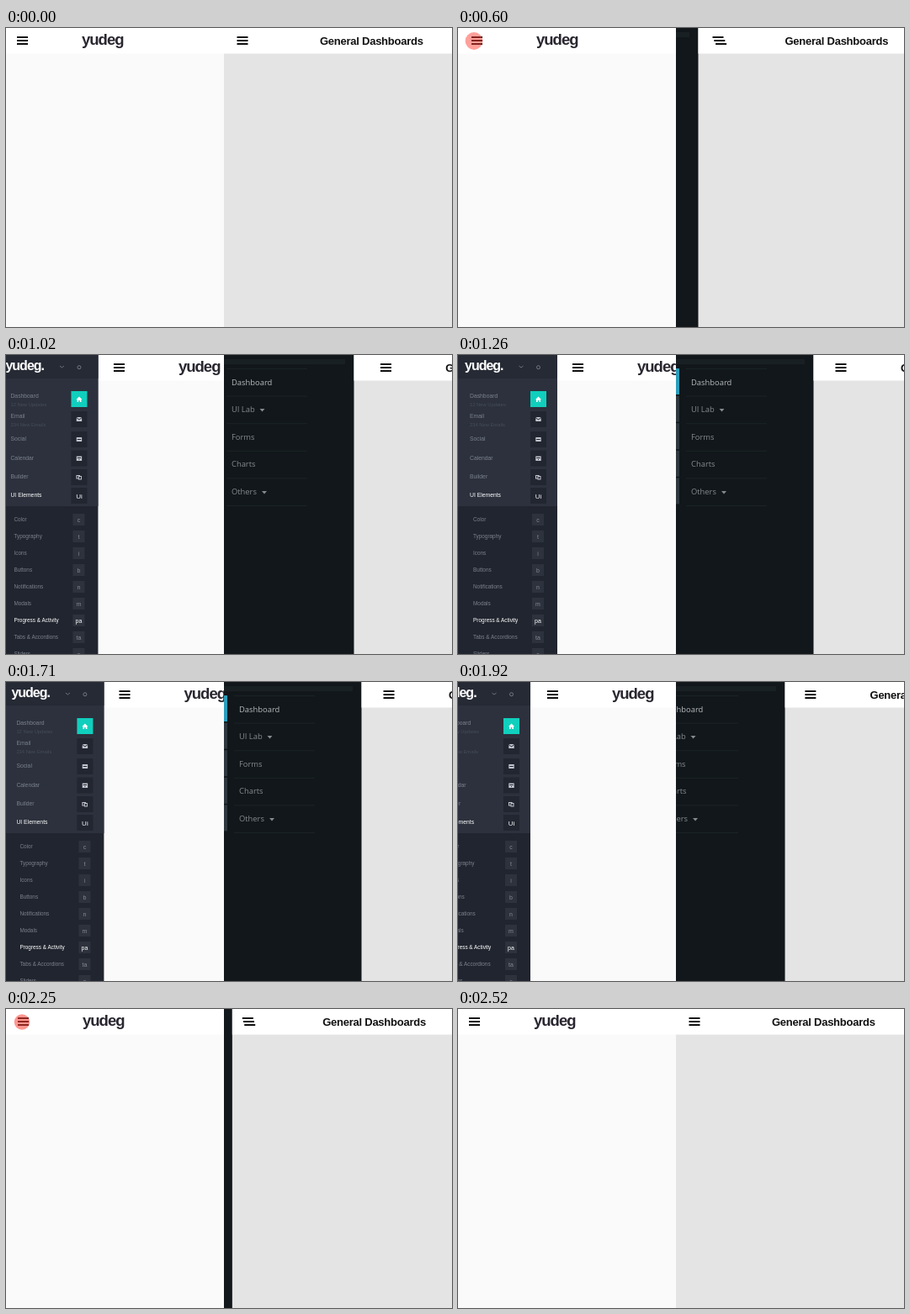
An HTML page for the animation above (2.82 s loop, 530 by 356 pixels).

```html
<!DOCTYPE html>
<html lang="en">
<head>
<meta charset="utf-8">
<title>Sliding menus</title>
<style>
  html, body { margin: 0; width: 100%; height: 100%; overflow: hidden; background: #fafafa; }
  svg { display: block; }
  text { font-family: "Liberation Sans", Arial, sans-serif; white-space: pre; }
  .brand { font-weight: bold; letter-spacing: -1px; }
  .title { font-weight: bold; font-size: 13px; letter-spacing: -.25px; fill: #111; }
  .nav { font: 9.4px "Open Sans", "Noto Sans", sans-serif; fill: #858b8f; }
  .main { font-size: 6.8px; fill: #7b818d; }
  .note { font-size: 5.8px; fill: #474d5a; }
  .sub { font-size: 6.4px; fill: #7b808b; }
  .key { font-size: 7px; fill: #858a95; text-anchor: middle; }
  .main.on, .sub.on, .key.on { fill: #fff; }
  .icon { fill: #c3c6cd; }
</style>
</head>
<body>
<svg width="530" height="356" viewBox="0 0 530 356">
  <clipPath id="leftHalf"><rect width="259" height="356"/></clipPath>
  <clipPath id="rightHalf"><rect x="259" width="271" height="356"/></clipPath>

  <g clip-path="url(#leftHalf)">
    <rect width="259" height="356" fill="#fafafa"/>
    <rect width="259" height="30.5" fill="#fff"/>
    <g id="page">
      <path d="M13 11h13M13 15h13M13 19h13" stroke="#111" stroke-width="2"/>
      <text class="brand" x="90" y="19.5" font-size="18.5" fill="#2a2730">yudeg</text>
    </g>
    <g id="sidebar">
      <rect x="-20" width="138" height="356" fill="#21252f"/>
      <rect x="-20" width="138" height="180" fill="#2c313d"/>
      <rect x="-20" width="138" height="28" fill="#262a35"/>
      <text class="brand" x="8" y="17.5" font-size="16" fill="#fff">yudeg.</text>
      <path d="M72.5 13l2.5 2 2.5-2" fill="none" stroke="#6d737f"/>
      <circle cx="95.5" cy="14.7" r="2" fill="none" stroke="#737984"/>
    </g>
    <circle id="tap" cx="19" cy="15.5" fill="#ff3b30"/>
  </g>

  <g clip-path="url(#rightHalf)">
    <rect x="259" width="271" height="356" fill="#11171a"/>
    <g id="menu"><rect x="180" y="5" width="232" height="6" fill="#192024"/></g>
    <g id="panel">
      <rect x="259" width="290" height="356" fill="#e4e4e4"/>
      <rect x="259" width="290" height="30.5" fill="#fff"/>
    </g>
    <g id="burger" stroke="#111" stroke-width="2">
      <path d="M274.5 11h13"/><path d="M274.5 15h13"/><path d="M274.5 19h13"/>
    </g>
    <text id="heading" class="title" x="373" y="19.5">General Dashboards</text>
  </g>
</svg>
<script>
const $ = id => document.getElementById(id);

function add(parent, tag, attrs, text = '') {
  const el = document.createElementNS('http://www.w3.org/2000/svg', tag);
  for (const key in attrs) el.setAttribute(key, attrs[key]);
  el.textContent = text;
  parent.append(el);
}

// Left sidebar: label, centre of its label, centre of its tile, icon path, note
const sections = [
  ['Dashboard', 48.5, 52.5, 'M92 53l3.5-3.5 3.5 3.5h-1v3h-1.7v-2h-1.6v2H93v-3z', '12 New Updates'],
  ['Email', 73, 76.5, 'M92.3 74h6.4l-3.2 2.4zM92.3 75l3.2 2.4 3.2-2.4v4h-6.4z', '234 New Emails'],
  ['Social', 100, 100.5, 'M92.3 98h6.4v5h-6.4zM93.3 100v1h4.4v-1z'],
  ['Calendar', 122.5, 123, 'M92.3 120.5h6.4v5.5h-6.4zM93.3 122v1h4.4v-1zM95 124v1h1v-1z'],
  ['Builder', 145, 145.5, 'M92 143h4.5v1h2v4.5h-4v-1H92zM93 144v2.5h1.5V144zM95.5 145v2.5h2V145z'],
  ['UI Elements', 167, 167.5]
];
const side = $('sidebar');
sections.forEach(([label, y, tile, icon, note], i) => {
  const on = icon ? '' : ' on';
  add(side, 'rect', {x: 86, y: tile - 9.5, width: 19, height: 19, fill: i ? '#222631' : '#10cfbd'});
  add(side, 'text', {class: 'main' + on, x: 14, y: y + 2.4}, label);
  if (note) add(side, 'text', {class: 'note', x: 14, y: y + 12.3}, note);
  if (icon) add(side, 'path', {class: 'icon', d: icon, 'fill-rule': 'evenodd', style: i ? '' : 'fill:#fff'});
  else add(side, 'text', {class: 'key on', x: 95.5, y: tile + 3, style: 'font-size:8px'}, 'Ui');
});

const elements = ['c Color', 't Typography', 'i Icons', 'b Buttons', 'n Notifications', 'm Modals',
  'pa Progress & Activity', 'ta Tabs & Accordions', 's Sliders'];
elements.forEach((entry, i) => {
  const [key, ...words] = entry.split(' '), y = 196 + i * 20, on = key === 'pa' ? ' on' : '';
  add(side, 'rect', {x: 88, y: y - 7, width: 14, height: 14, fill: '#2d323d'});
  add(side, 'text', {class: 'sub' + on, x: 18, y: y + 2.3}, words.join(' '));
  add(side, 'text', {class: 'key' + on, x: 95, y: y + 2.5}, key);
});

// Right menu: label and optional caret position
const menu = $('menu');
[['Dashboard'], ['UI Lab', 310.5], ['Forms'], ['Charts'], ['Others', 313]].forEach(([label, caret], i) => {
  const y = 32 + i * 32.6;
  add(menu, 'rect', {x: 230, y: y - 16, width: 33, height: 31, fill: i ? '#30383e' : '#2b9ebb'});
  add(menu, 'text', {class: 'nav', x: 277, y: y + 3.6, style: i ? '' : 'fill:#b7bcbf'}, label);
  if (caret) add(menu, 'path', {d: `M${caret} ${y - .5}h6l-3 3.5z`, fill: '#858b8f'});
});
for (let i = 0; i < 6; i++)
  add(menu, 'path', {d: `M271 ${16.5 + i * 32.6}h96`, stroke: '#1c2326'});

// Smooth monotone curve through [x, y] points
function curve(points) {
  const slope = i => {
    const a = points[i], b = points[i + 1];
    return a && b ? (b[1] - a[1]) / (b[0] - a[0]) : 0;
  };
  const tangent = i => {
    const p = slope(i - 1), q = slope(i);
    return p * q > 0 ? 2 * p * q / (p + q) : 0;
  };
  slopeAtEdges = 0;
  return x => {
    const last = points.length - 1;
    if (x <= points[0][0]) return points[0][1];
    if (x >= points[last][0]) return points[last][1];
    const i = points.findIndex(p => p[0] > x) - 1;
    const [x0, y0] = points[i], [x1, y1] = points[i + 1], h = x1 - x0, u = (x - x0) / h;
    return y0 + (y1 - y0) * u * u * (3 - 2 * u)
      + h * u * (1 - u) * (tangent(i) * (1 - u) - tangent(i + 1) * u);
  };
}

const pageShift = curve([[540, 0], [600, 3], [720, 15], [840, 72.5], [960, 107], [1110, 121.5], [1260, 123], [1350, 123.3]]);
const panelShift = curve([[540, 0], [600, 26.5], [720, 82.5], [840, 114.5], [960, 143], [1060, 160], [1110, 163.5]]);
const burgerShift = curve([[0, 0], [26.5, 28], [82.5, 86], [114.5, 117.5], [163.5, 174]]);
const headingShift = curve([[0, 0], [26.5, 15.5], [82.5, 64.5], [114.5, 96], [163.5, 153]]);

const LOOP = 2820, STEP = 30;
const shift = (el, x) => el.setAttribute('transform', `translate(${x.toFixed(2)})`);

function draw(time) {
  // Opening plays forward, closing is the same motion backwards
  const t = Math.min(time, LOOP - time);
  const page = pageShift(t), panel = panelShift(t);
  shift($('page'), page);
  shift(side, -131 + 1.065 * page);
  shift(menu, panel - 163.5);
  shift($('panel'), panel);
  shift($('heading'), headingShift(panel));
  const lag = Math.max(0, 1 - Math.abs(t - 600) / 90);
  [...$('burger').children].forEach((bar, i) => shift(bar, burgerShift(panel) + i * 1.8 * lag));
  $('tap').setAttribute('r', Math.max(0, (t - 330) / 26));
  $('tap').setAttribute('opacity', Math.min(1, Math.max(0, (850 - t) / 520)));
}

const start = performance.now();
function tick() {
  const time = (performance.now() - start + 8) % LOOP;
  draw(Math.floor(time / STEP) * STEP);
  requestAnimationFrame(tick);
}
tick();
</script>
</body>
</html>
```
